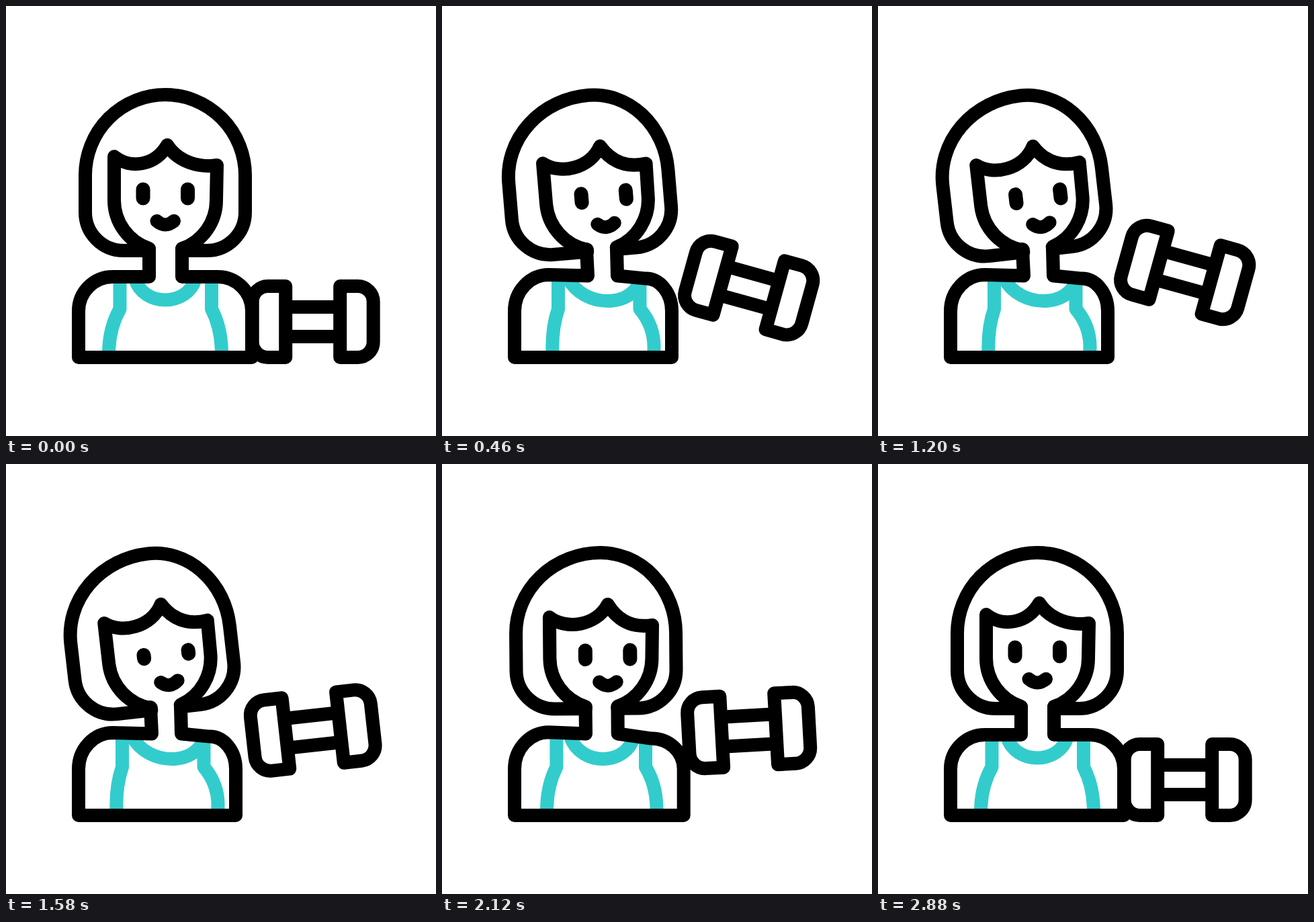
An HTML page that plays this animation: 640 px wide and 640 px high, repeating every 3 s.

```html
<!DOCTYPE html>
<html lang="en">
<head>
<meta charset="utf-8">
<title>Dumbbell workout</title>
<style>
html, body { margin: 0; width: 100%; height: 100%; overflow: hidden; background: #fff; }
svg { display: block; width: 100%; height: 100%; }
path { fill: none; stroke: #000; stroke-width: 20; stroke-linecap: round; stroke-linejoin: round; }
#shirt { stroke: #33cccc; stroke-linecap: butt; }
#eyes { stroke-width: 21; }
</style>
</head>
<body>
<svg viewBox="0 0 640 640">
  <path id="shirt"/>
  <path id="torso"/>
  <g id="head">
    <path id="hair"/>
    <path id="face"/>
    <g id="features">
      <path id="eyes"/>
      <path d="M224.5 320Q237 331 250 320"/>
    </g>
  </g>
  <g id="bell">
    <path id="plate" d="M-40.5-53H-67A23 23 0 0 0-90-30V30A23 23 0 0 0-67 53H-40.5Z"/>
    <use href="#plate" transform="scale(-1 1)"/>
    <path d="M-40-22H40M-40 22H40"/>
  </g>
</svg>
<script>
const LOOP = 3000;
const set = (id, name, value) => document.getElementById(id).setAttribute(name, value);

// Smooth step from 0 to 1 between two times
function rise(t, from, to) {
  const p = Math.min(1, Math.max(0, (t - from) / (to - from)));
  return (1 - Math.cos(Math.PI * p)) / 2;
}

// Rises to 1, holds, falls back to 0
const hold = (t, up, top, down, end) => rise(t, up, top) - rise(t, down, end);

function drawBody(turn, narrow) {
  const neckL = 213 + 4 * narrow, neckR = 262 - narrow, neckY = 403 - 1.5 * turn;
  const right = 366 - 24 * narrow;
  const yl = 403 - 4 * turn + narrow, yr = 403 + 6.6 * turn - 4 * narrow;
  set('torso', 'd', `M${neckL - 2 * narrow} 362L${neckL} ${neckY}L159 ${yl}` +
    `A51 ${454 - yl} 0 0 0 108 454V523H${right}V454` +
    `A${51 - 12 * narrow} ${454 - yr} 0 0 0 ${315 - 12 * narrow} ${yr}` +
    `L${neckR} ${neckY}L${neckR - narrow} 362`);

  const strap = (top, bottom, bulge) => `M${top} 402V451Q${bottom + bulge} 480 ${bottom} 518`;
  const from = 192 - 4 * narrow, to = 282 + 14 * narrow, dip = 448 + 2 * turn;
  set('shirt', 'd', strap(169.5 + 3.5 * narrow, 153 + 11.5 * narrow, -1.5 * narrow) +
    strap(306 - 11.5 * narrow, 321 - 6 * narrow, 4 * narrow) +
    `M${from} 406C${from + 12 + 12 * narrow} ${dip} ${to - 12} ${dip} ${to} 406`);
}

function drawHead(turn, narrow, tilt, open) {
  const side = 6 * turn + 4 * narrow, left = 118 - side, right = 356 - side;
  const neckL = 213 + 3 * narrow, neckR = 262 - 2 * narrow;
  set('head', 'transform', `rotate(${tilt} 237 362)`);
  set('hair', 'd', `M${neckL} 364H${left + 57}A57 57 0 0 1 ${left} 307V252` +
    `A${237 - left} 120 0 0 1 237 132A${right - 237} 120 0 0 1 ${right} 252` +
    `V307A57 57 0 0 1 ${right - 57} 364H${neckR}`);

  const peak = 240 + 8 * turn, drop = 3.5 * turn;
  set('face', 'd', `M${neckL} 361A76 76 0 0 1 161 289V${224 + drop}` +
    `C185 ${243 + drop} ${peak - 18} ${238 + drop} ${peak} ${207 + 2 * turn}` +
    `C${peak + 16} ${232 + drop} 287 ${241 + drop} 314 ${237 + drop}` +
    `L313 289A76 76 0 0 1 ${neckR} 361`);

  set('features', 'transform', `translate(${10 * turn} ${4.5 * turn})`);
  const half = 0.05 + 6.5 * open;
  set('eyes', 'd', [204, 270.5].map(x => `M${x} ${279.5 - half}v${2 * half}`).join(''));
}

function drawBell(t) {
  // One and a half swings, then the last lean settles
  const start = 555, period = 740, last = start + 1.5 * period;
  const swing = 5 + 15 * Math.cos(2 * Math.PI * (Math.min(t, last) - start) / period);
  const angle = swing * hold(t, 200, 440, last, 2400);
  const y = 470 - 73.5 * hold(t, 110, 675, 2180, 2800);
  set('bell', 'transform', `translate(456.7 ${y}) rotate(${angle})`);
}

function frame(now) {
  const t = now % LOOP;
  const turn = hold(t, 100, 440, 2220, 2890);
  const narrow = hold(t, 100, 440, 1700, 2340);
  const tilt = -6.5 * hold(t, 100, 650, 1740, 2200);
  const open = Math.min(1, Math.abs(t - 760) / 100, Math.abs(t - 1540) / 100);
  drawBody(turn, narrow);
  drawHead(turn, narrow, tilt, open);
  drawBell(t);
  requestAnimationFrame(frame);
}
frame(performance.now());
</script>
</body>
</html>
```
